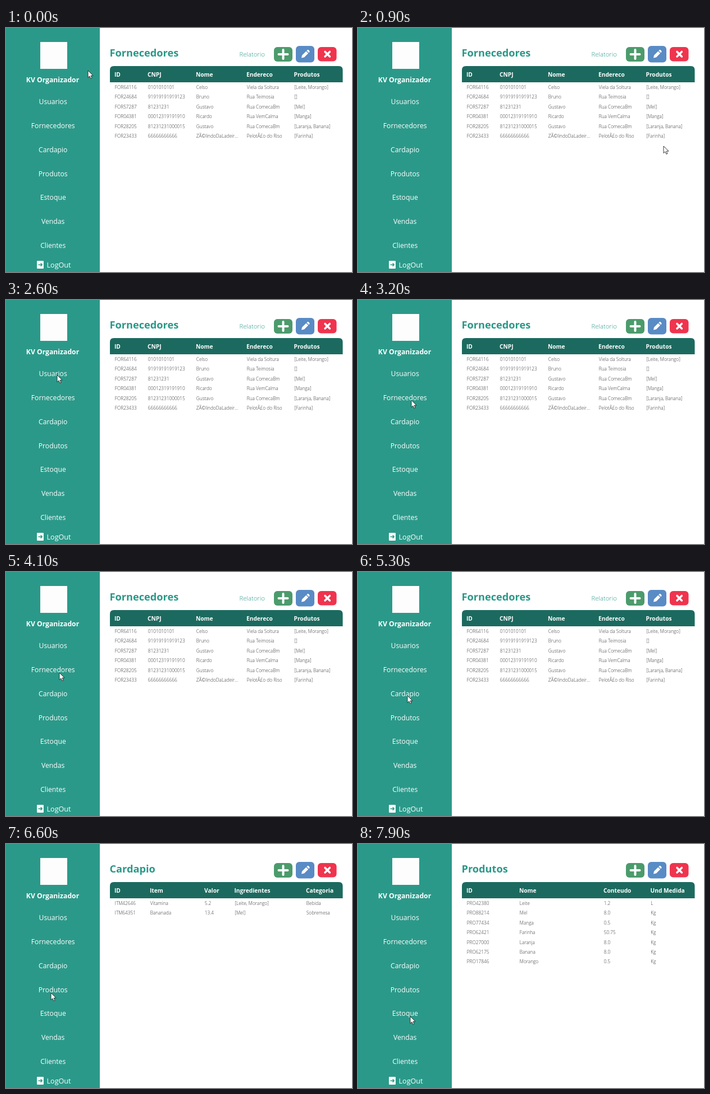
An HTML page for the animation above (8000 ms loop, 616x436 px).

```html
<!DOCTYPE html>
<html lang="pt">
<head>
<meta charset="utf-8">
<title>Gerenciador</title>
<style>
  html, body { margin: 0; width: 100%; height: 100%; overflow: hidden; background: #fff; }
  svg { display: block; width: 616px; height: 436px; font-family: "Open Sans", "Noto Sans", sans-serif; }

  .menu { fill: #fff; font-size: 12.2px; text-anchor: middle; }
  .brand { fill: #fff; font-size: 12.2px; font-weight: 700; text-anchor: middle; }
  .logout { fill: #fff; font-size: 12.6px; }
  .title { fill: #2a9888; font-size: 18.2px; font-weight: 700; }
  .report { fill: #2a9888; font-size: 11.3px; font-weight: 300; }
  .head { fill: #fff; font-size: 10.2px; font-weight: 700; }
  .cell { fill: #333; font-size: 8.25px; font-weight: 300; }

  .page { opacity: 0; animation: 8s step-end infinite; }
  #suppliers { animation-name: suppliers; }
  #dishes { animation-name: dishes; }
  #products { animation-name: products; }
  @keyframes suppliers { 0% { opacity: 1 } 72.5%, 100% { opacity: 0 } }
  @keyframes dishes { 0% { opacity: 0 } 72.5% { opacity: 1 } 90%, 100% { opacity: 0 } }
  @keyframes products { 0% { opacity: 0 } 90%, 100% { opacity: 1 } }

  /* The pointer is sampled ten times a second, so each leg moves in 100 ms steps. */
  #pointer { animation: pointer 8s step-end infinite; }
  @keyframes pointer {
    0% { transform: translate(146px, 76px); animation-timing-function: steps(3) }
    3.75% { transform: translate(215px, 200px); animation-timing-function: steps(2) }
    6.25% { transform: translate(370px, 325px); animation-timing-function: steps(2) }
    8.75% { transform: translate(530px, 315px); animation-timing-function: steps(2) }
    11.25% { transform: translate(544px, 211px) }
    17.5% { transform: translate(544px, 211px); animation-timing-function: steps(4) }
    22.5% { transform: translate(89px, 140px) }
    25% { transform: translate(89px, 140px); animation-timing-function: steps(3) }
    28.75% { transform: translate(78px, 146px); animation-timing-function: steps(3) }
    32.5% { transform: translate(91px, 134px); animation-timing-function: steps(3) }
    36.25% { transform: translate(95px, 179px) }
    47.5% { transform: translate(95px, 180px) }
    51.25% { transform: translate(95px, 180px); animation-timing-function: steps(8) }
    61.25% { transform: translate(91px, 224px) }
    62.5% { transform: translate(90px, 222px) }
    63.75% { transform: translate(90px, 222px); animation-timing-function: steps(2) }
    66.25% { transform: translate(88px, 221px) }
    71.25% { transform: translate(88px, 221px); animation-timing-function: steps(5) }
    77.5% { transform: translate(72px, 291px); animation-timing-function: steps(4) }
    82.5% { transform: translate(80px, 266px) }
    88.75% { transform: translate(80px, 266px); animation-timing-function: steps(6) }
    96.25% { transform: translate(87px, 308px) }
    98.75%, 100% { transform: translate(93px, 308px) }
  }
</style>
</head>
<body>
<svg viewBox="0 0 616 436">
  <rect width="616" height="436" fill="#fff"/>
  <rect width="167" height="436" fill="#2b9989"/>
  <rect x="61" y="25" width="48" height="48" fill="#fdfdfd"/>
  <text class="brand" x="83" y="97">KV Organizador</text>
  <g id="menu"></g>
  <rect x="55" y="416" width="12" height="14" rx="1" fill="#fff"/>
  <path d="M57.5 423H64M61.6 420.4L64.2 423L61.6 425.6" fill="none" stroke="#2b9989" stroke-width="1.6"/>
  <text class="logout" x="72.5" y="427.7">LogOut</text>

  <rect x="477" y="34" width="33" height="26" rx="6" fill="#4c9b6c"/>
  <path d="M485.5 47H501.5M493.5 39V55" stroke="#fff" stroke-width="4" stroke-linecap="round"/>
  <rect x="516" y="32" width="33" height="29.5" rx="6" fill="#598bc5"/>
  <path d="M526 53.5L527.1 48.7L534.3 41.5L538.1 45.3L530.9 52.5ZM535.3 40.5L536.6 39.2Q537.6 38.4 538.6 39.3L540.2 41Q541.1 42 540.3 43L539.1 44.3Z" fill="#fff"/>
  <rect x="555" y="34" width="33.5" height="25.5" rx="6" fill="#ef344e"/>
  <path d="M568 42.5L576.4 50.9M576.4 42.5L568 50.9" stroke="#fff" stroke-width="3.6" stroke-linecap="round"/>

  <path d="M185 97V75Q185 68 192 68H592.5Q599.5 68 599.5 75V97Z" fill="#1c6a5f"/>
  <g id="pages"></g>
  <path id="pointer" d="M0 0V12.6L2.9 9.9L4.9 14.4L7 13.5L5.1 9.1H9.1Z" fill="#fff" stroke="#222" stroke-width=".9" stroke-linejoin="round"/>
</svg>

<script>
  const pages = [
    {
      id: "suppliers", title: "Fornecedores", report: true,
      columns: { ID: 193, CNPJ: 252, Nome: 338, Endereco: 428, Produtos: 512.5 },
      rows: [
        "FOR64116|0101010101|Celso|Viela da Soltura|[Leite, Morango]",
        "FOR24684|91919191919123|Bruno|Rua Teimosia|[]",
        "FOR57287|81231231|Gustavo|Rua ComecaBm|[Mel]",
        "FOR04381|00012319191910|Ricardo|Rua VemCalma|[Manga]",
        "FOR28205|81231231000015|Gustavo|Rua ComecaBm|[Laranja, Banana]",
        "FOR23433|66666666666|ZÃ©lindoDaLadeir...|PelotÃ£o do Riso|[Farinha]"
      ]
    },
    {
      id: "dishes", title: "Cardapio",
      columns: { ID: 193, Item: 256, Valor: 353, Ingredientes: 406.5, Categoria: 534 },
      rows: [
        "ITM42646|Vitamina|5.2|[Leite, Morango]|Bebida",
        "ITM64351|Bananada|13.4|[Mel]|Sobremesa"
      ]
    },
    {
      id: "products", title: "Produtos",
      columns: { ID: 193, Nome: 287, Conteudo: 437, "Und Medida": 520.5 },
      rows: [
        "PRO42380|Leite|1.2|L",
        "PRO88214|Mel|8.0|Kg",
        "PRO77434|Manga|0.5|Kg",
        "PRO62421|Farinha|50.75|Kg",
        "PRO27000|Laranja|8.0|Kg",
        "PRO62175|Banana|8.0|Kg",
        "PRO17846|Morango|0.5|Kg"
      ]
    }
  ];

  const text = (kind, x, y, label) => `<text class="${kind}" x="${x}" y="${y}">${label}</text>`;

  function drawPage({ id, title, report, columns, rows }) {
    const xs = Object.values(columns);
    const parts = [text("title", 184.5, 50.8, title)];
    if (report) parts.push(text("report", 415.5, 51, "Relatorio"));
    for (const [name, x] of Object.entries(columns)) parts.push(text("head", x, 87, name));
    rows.forEach((row, r) => row.split("|").forEach((value, c) =>
      parts.push(text("cell", xs[c] + 0.8, 109 + r * 17.4, value))));
    return `<g class="page" id="${id}">${parts.join("")}</g>`;
  }

  const items = ["Usuarios", "Fornecedores", "Cardapio", "Produtos", "Estoque", "Vendas", "Clientes"];
  document.getElementById("menu").innerHTML =
    items.map((label, i) => text("menu", 83.7, 136.2 + i * 42.8, label)).join("");
  document.getElementById("pages").innerHTML = pages.map(drawPage).join("");
</script>
</body>
</html>
```
